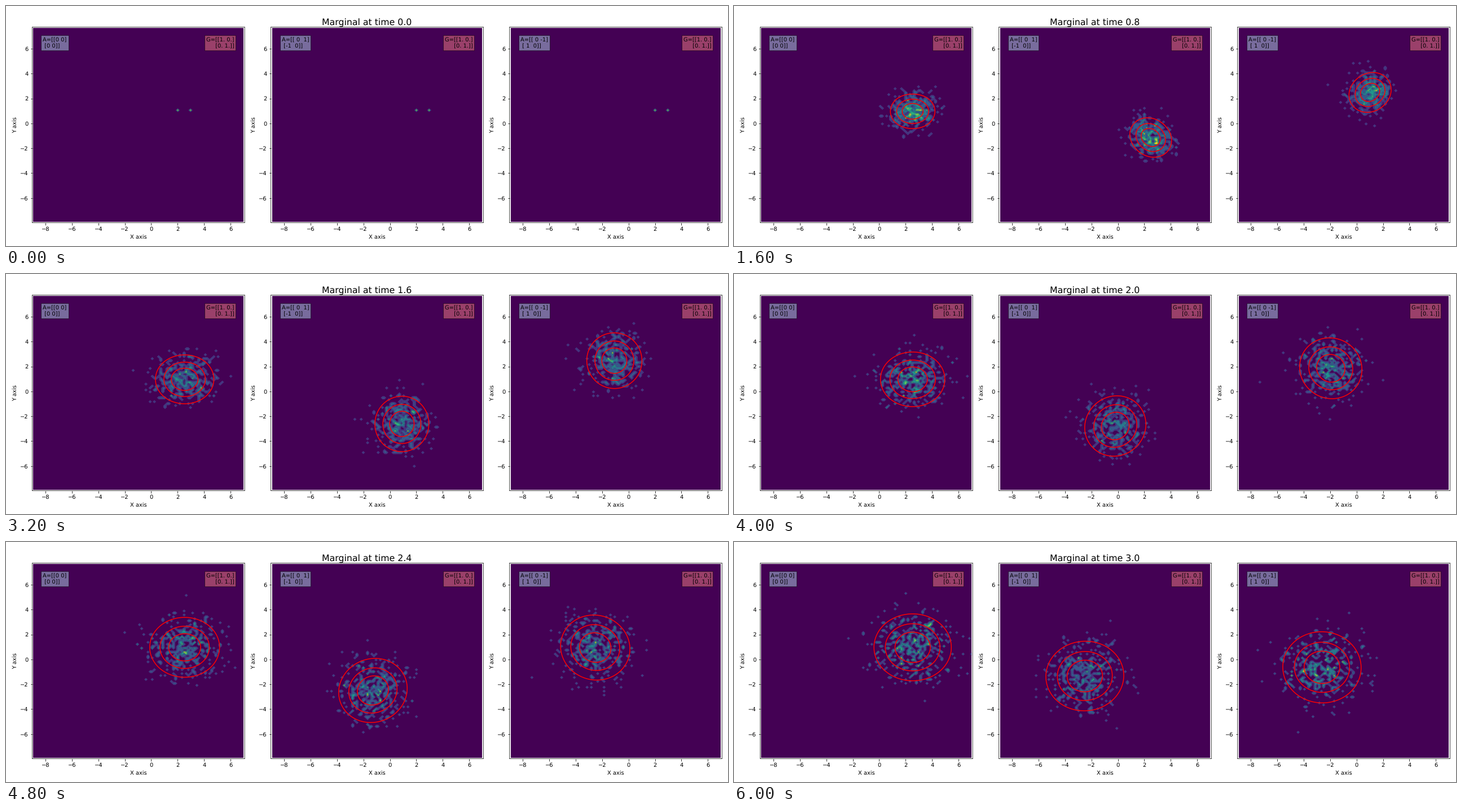
Write a matplotlib script that moves like this. It is 1280 by 427 pixels and loops after 6.1 s.

```python
import numpy as np
import matplotlib.pyplot as plt
from matplotlib.animation import FuncAnimation
from matplotlib.patches import Rectangle

W, H, DPI = 1280, 427, 72
FRAMES, DT, N = 61, 0.05, 420
XLIM, YLIM, BINS = (-9.0, 7.07), (-7.98, 7.74), 100
FONT = 80 / 81  # keeps text in step with an 18 inch wide layout
RINGS = (0.30, 0.55, 0.78)
SHADES = 8
CLOUD = 0.82  # spread of the samples against the rings

# left edge, drift matrix, spin, mean shift, mean drift, gap growth, spread
PANELS = [
    (46.6, [[0, 0], [0, 0]], 0, (0.03, -0.03), (0, 0), 0.07, 1.00),
    (469.7, [[0, 1], [-1, 0]], -1, (0, 0), (0.055, -0.01), 0.03, 1.08),
    (892.8, [[0, -1], [1, 0]], 1, (0, 0), (0, 0), 0.0, 1.13),
]

plt.rcParams.update({"font.family": "DejaVu Sans", "font.size": 10 * FONT,
                     "text.hinting": "none", "axes.linewidth": 0.75})
fig = plt.figure(figsize=(W / DPI, H / DPI), dpi=DPI, facecolor="white")
title = fig.suptitle("", y=0.95, fontsize=16 * FONT)

xedges = np.linspace(*XLIM, BINS + 1)
yedges = np.linspace(*YLIM, BINS + 1)
xmid = (xedges[:-1] + xedges[1:]) / 2
ymid = (yedges[:-1] + yedges[1:]) / 2
viridis = plt.get_cmap("viridis")
shades = viridis(np.linspace(0.15, 1, SHADES))


def rotate(x, y, angle):
    c, s = np.cos(angle), np.sin(angle)
    return c * x - s * y, s * x + c * y


def note(ax, x, label, matrix, ha, color):
    ax.text(x, 0.95, f"{label}={matrix}", transform=ax.transAxes, ha=ha, va="top",
            bbox=dict(boxstyle="square", facecolor=color, alpha=0.5), zorder=5)


class Panel:
    def __init__(self, seed, left, drift, spin, shift, slide, grow, spread):
        self.spin, self.grow, self.spread = spin, grow, spread
        self.shift, self.slide = np.array(shift), np.array(slide)
        rng = np.random.default_rng(seed)
        steps = rng.normal(0, CLOUD * np.sqrt(DT), (FRAMES, N, 2))
        steps[0] = 0
        walk = steps.cumsum(axis=0)
        self.walk = walk - walk.mean(axis=1, keepdims=True)
        self.side = np.where(np.arange(N) % 2, 0.5, -0.5)
        self.drawn = []

        ax = self.ax = fig.add_axes([left / W, 1 - 385.5 / H, 376.5 / W, 348 / H])
        ax.set(xlim=XLIM, ylim=YLIM, xlabel="X axis", ylabel="Y axis")
        ax.set_xticks(range(-8, 7, 2))
        ax.set_yticks(range(-6, 7, 2))
        for spine in ax.spines.values():
            spine.set_snap(False)
        ax.add_patch(Rectangle((xmid[0], ymid[0]), xmid[-1] - xmid[0],
                               ymid[-1] - ymid[0], color=viridis(0.0), lw=0, zorder=0))
        note(ax, 0.05, "A", np.array(drift), "left", "lightblue")
        note(ax, 0.95, "G", np.eye(2), "right", "lightcoral")

    def draw(self, i):
        for item in self.drawn:
            item.remove()
        t = i * DT
        angle = self.spin * t
        mean = np.array([2.5, 1.0])
        if i:
            mean = mean + self.shift + self.slide * t
        self.drawn = [self.density(i, mean, angle)]
        if i:
            self.drawn.append(self.rings(t, mean, angle))

    def density(self, i, mean, angle):
        pts = self.walk[i] + mean
        x, y = rotate(pts[:, 0] + self.side, pts[:, 1], angle)
        counts = np.histogram2d(x, y, bins=(xedges, yedges))[0].T
        top = counts.max()
        levels = np.linspace(min(0.2, top / 8), top * 1.001, SHADES + 1)
        return self.ax.contourf(xmid, ymid, counts, levels=levels,
                                colors=shades, antialiased=True, zorder=1)

    def rings(self, t, mean, angle):
        var = self.spread * t
        gap = 0.5 + self.grow * t
        reach = 1 + 1.8 * np.sqrt(var)
        u, v = np.meshgrid(*[np.linspace(-reach, reach, 101)] * 2)
        pdf = sum(np.exp(-((u - s * gap) ** 2 + v ** 2) / (2 * var)) for s in (-1, 1))
        x, y = rotate(u + mean[0], v + mean[1], angle)
        return self.ax.contour(x, y, pdf / pdf.max(), levels=RINGS, colors="red",
                               linewidths=1.5, zorder=2)


panels = [Panel(11 + k, *spec) for k, spec in enumerate(PANELS)]


def update(i):
    title.set_text(f"Marginal at time {i * DT:.1f}")
    for panel in panels:
        panel.draw(i)
        panel.ax.set(xlim=XLIM, ylim=YLIM)
    return []


anim = FuncAnimation(fig, update, frames=FRAMES, init_func=lambda: update(0),
                     interval=100, repeat=True, repeat_delay=0, blit=False)
plt.show()
```
